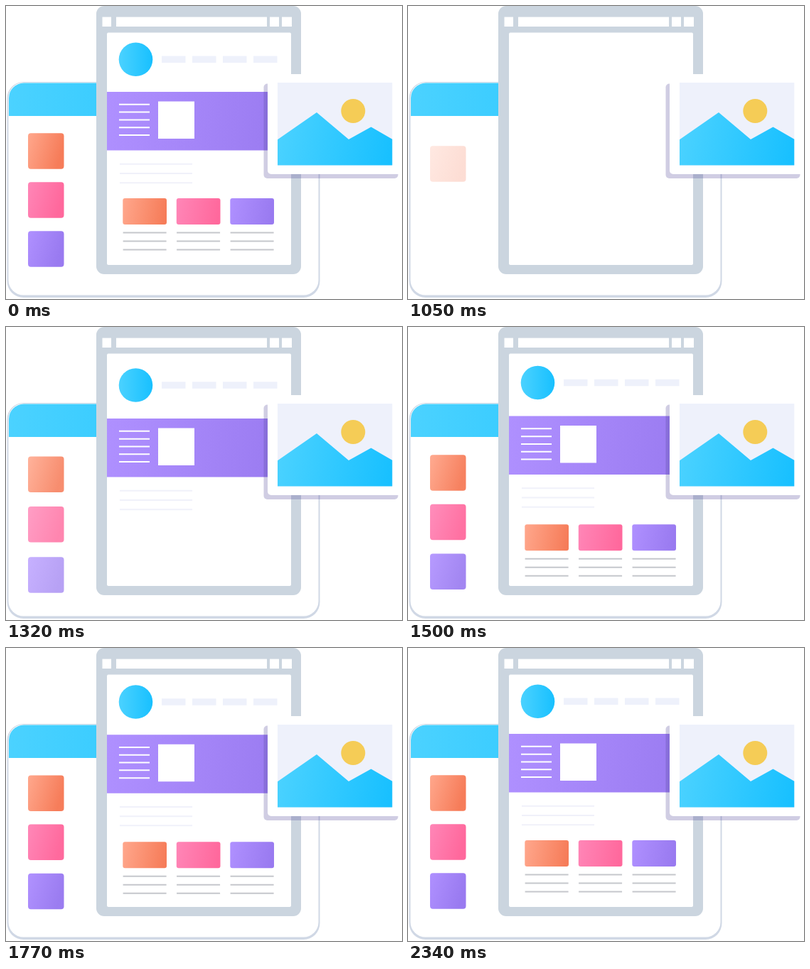
An HTML page with a canvas that plays this animation: 557x413 px, repeating every 2700 ms.

```html
<!DOCTYPE html>
<html>
<head>
<meta charset="utf-8">
<style>
  html, body { margin: 0; width: 100%; height: 100%; overflow: hidden; background: #fff; }
  canvas { display: block; }
</style>
</head>
<body>
<canvas id="stage" width="557" height="413"></canvas>
<script>
const LOOP = 2700, TILES_OUT = 900, PAGE_OUT = 1020;
const ctx = document.getElementById('stage').getContext('2d');

const BLUE = ['#4bd2ff', '#18c0ff'];
const ACCENTS = [['#ffa78c', '#f67c59'], ['#ff86b7', '#ff689c'], ['#af90ff', '#997af0']];
const PURPLE = ACCENTS[2];
const PALE = '#eef1fb', STEEL = '#cbd5df';

function blend([from, to], x0, y0, x1, y1) {
  const g = ctx.createLinearGradient(x0, y0, x1, y1);
  g.addColorStop(0, from);
  g.addColorStop(1, to);
  return g;
}

function box(x, y, w, h, fill, r = 0) {
  ctx.fillStyle = Array.isArray(fill) ? blend(fill, x, y, x + w, y + h * .3) : fill;
  ctx.beginPath();
  ctx.roundRect(x, y, w, h, r);
  ctx.fill();
}

function disc(x, y, r, fill) {
  ctx.fillStyle = Array.isArray(fill) ? blend(fill, x - r, y, x + r, y) : fill;
  ctx.beginPath();
  ctx.arc(x, y, r, 0, 7);
  ctx.fill();
}

function rules(x, y, w, gap, count, color) {
  for (let i = 0; i < count; i++) box(x, y + i * gap, w, 2, color);
}

function shifted(dy, alpha, draw) {
  ctx.save();
  ctx.globalAlpha = alpha;
  ctx.translate(0, dy);
  draw();
  ctx.restore();
}

// Tiles rise and fade in together, fast at first
function riseTile(t, start, draw) {
  if (t < TILES_OUT) draw();
  else if (t > start) {
    const left = Math.exp((start - t) / 155);
    shifted(24 * left, 1 - left, draw);
  }
}

// Page parts appear quickly, then ease up softly from rest
function risePart(t, start, draw) {
  if (t < PAGE_OUT) draw();
  else if (t > start) {
    const u = (t - start) / 140;
    shifted(8.2 * (1 + u) * Math.exp(-u), Math.min(1, (t - start) / 30), draw);
  }
}

function backWindow(t) {
  box(1.5, 107, 440, 304, '#d0d8e5', 23);
  box(3.5, 108, 436, 299.5, '#fff', 21);
  ctx.fillStyle = blend(BLUE, 4, 0, 440, 0);
  ctx.beginPath();
  ctx.roundRect(4, 108.6, 140, 46.4, [21, 0, 0, 0]);
  ctx.fill();
  ACCENTS.forEach((color, i) =>
    riseTile(t, 1005 + 63 * i, () => box(31, 179.3 + 69 * i, 50.5, 50.5, color, 4)));
}

function page(t) {
  box(127, 0, 288, 378, STEEL, 11);
  box(142, 37.5, 259, 327.5, '#fff', 2);
  box(135.5, 15.5, 12.5, 13.5, '#fff');
  box(155, 15.5, 212, 13.5, '#fff');
  box(371, 15.5, 13, 13.5, '#fff');
  box(388, 15.5, 14, 13.5, '#fff');

  risePart(t, 1215, () => {
    disc(182.5, 75.3, 23.8, BLUE);
    for (let i = 0; i < 4; i++) box(219 + 43 * i, 70.5, 33.5, 9.5, PALE);
  });
  risePart(t, 1290, () => {
    box(142, 121, 259, 82.5, PURPLE);
    rules(159, 137.8, 43, 10.8, 5, '#fff');
    box(214, 134.5, 51, 52.5, '#fff');
    rules(160, 221.8, 102, 13.2, 3, '#f0f1fa');
  });
  risePart(t, 1420, () => ACCENTS.forEach((color, i) => {
    const x = 164.3 + 75.5 * i;
    box(x, 271, 61.7, 37, color, 3);
    rules(x + .3, 318.5, 61, 12, 3, '#c5c7cc');
  }));
}

function picture() {
  box(362.5, 109.5, 189, 133.5, 'rgba(82, 70, 150, .27)', 5);
  box(368, 96, 190, 141, '#fff', 5);
  box(382, 108, 161.3, 116.5, PALE);
  disc(488.3, 148, 17, '#f5cc56');
  ctx.fillStyle = blend(BLUE, 382, 170, 543, 200);
  ctx.fill(new Path2D('M382 188.3 L437 150 L482 188 L513.5 170.5 L543.3 187.8 V224.5 H382 Z'));
}

const begin = performance.now();
function frame() {
  const t = (performance.now() - begin) % LOOP;
  ctx.fillStyle = '#fff';
  ctx.fillRect(0, 0, 557, 413);
  backWindow(t);
  page(t);
  picture();
  requestAnimationFrame(frame);
}
frame();
</script>
</body>
</html>
```
